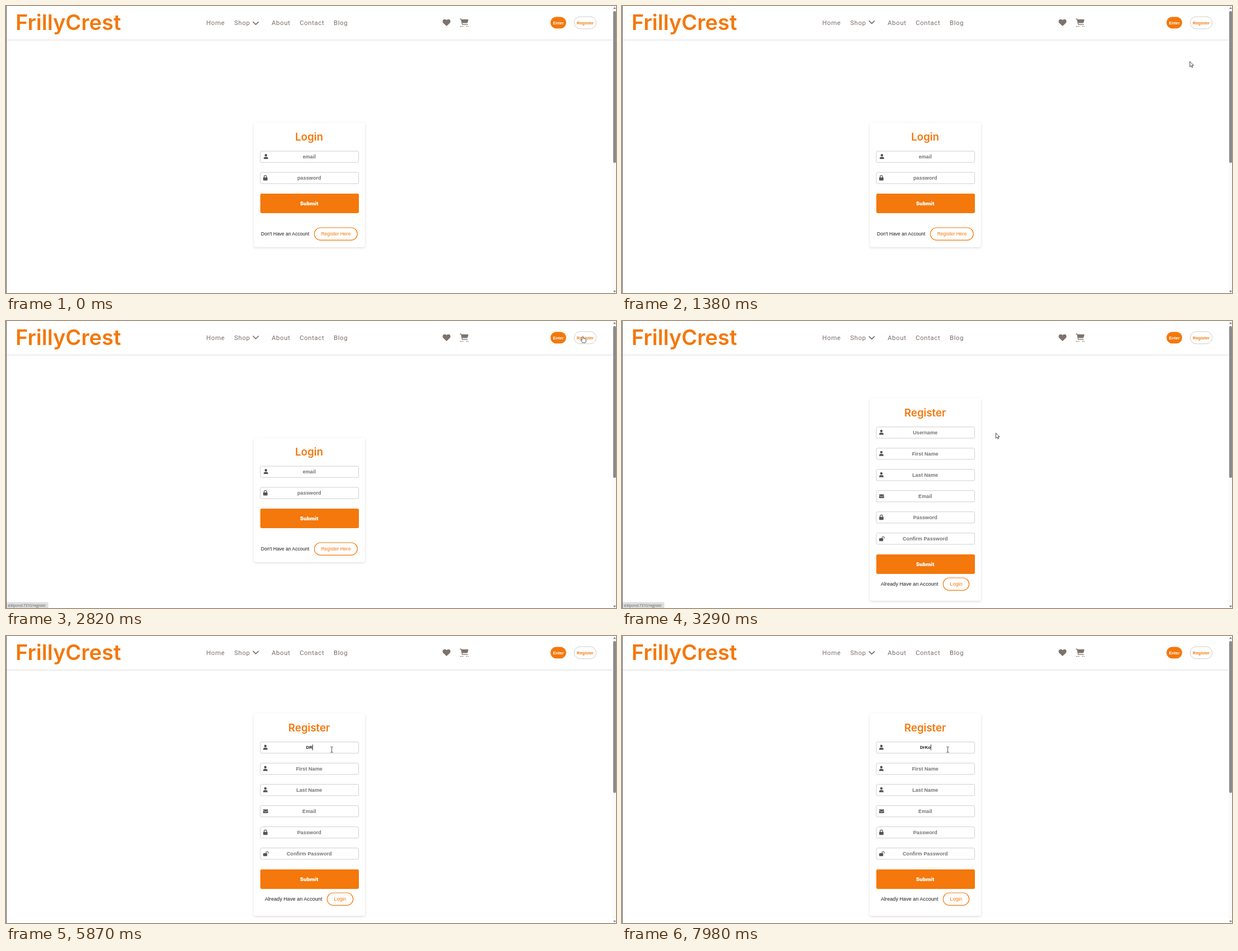
Write an HTML page that moves like this. It is 1089x514 px and loops after 8 s.

```html
<!DOCTYPE html>
<html lang="en">
<head>
<meta charset="utf-8">
<title>Shop sign-in</title>
<style>
  html, body { margin: 0; width: 100%; height: 100%; overflow: hidden; background: #fff; }
  svg { display: block; width: 1089px; height: 514px; }
  .title { font: 600 18.6px Inter, sans-serif; fill: #f4780b; text-anchor: middle; }
  .nav { font: 400 11.4px Roboto, sans-serif; letter-spacing: .61px; fill: #796e68; }
  .arial { font-family: "Liberation Sans", Arial, sans-serif; }
  .hint { font-weight: 700; font-size: 9.15px; fill: #757575; text-anchor: middle; }
  .status { font: 400 6.5px "Open Sans", sans-serif; fill: #5c5c5c; }
</style>
</head>
<body>
<svg id="stage" viewBox="0 0 1089 514" xmlns="http://www.w3.org/2000/svg">
  <defs>
    <filter id="shade" x="-10%" y="-10%" width="120%" height="120%">
      <feDropShadow dx="0" dy="1.5" stdDeviation="2" flood-color="#000" flood-opacity=".14"/>
    </filter>
    <g id="user" fill="#555">
      <circle cy="-2.7" r="2.2"/>
      <path d="M-3.9 4.1V3.2Q-3.9 .3-1 .3H1Q3.9 .3 3.9 3.2V4.1Z"/>
    </g>
    <g id="lock">
      <rect x="-3.9" y="-1" width="7.8" height="5.6" rx="1" fill="#555"/>
      <path d="M-2.3 -.6V-2A2.3 2.3 0 0 1 2.3 -2V-.6" fill="none" stroke="#555" stroke-width="1.2"/>
    </g>
    <g id="open">
      <rect x="-3.9" y="-.6" width="7.2" height="5.2" rx="1" fill="#555"/>
      <path d="M1.3 0V-1.8A1.9 1.9 0 0 1 5.1 -1.8V-.2" fill="none" stroke="#555" stroke-width="1.2"/>
    </g>
    <g id="mail">
      <rect x="-4" y="-3.3" width="8.8" height="6.8" rx="1" fill="#555"/>
      <path d="M-4 -1.3L.4 1.6L4.8 -1.3" fill="none" stroke="#fff" stroke-width=".7"/>
    </g>
  </defs>

  <rect width="1089" height="514" fill="#fff"/>
  <path d="M0 61H1083" stroke="#d9d9d9" stroke-width="1.2"/>
  <path d="M.5 0V514" stroke="#555"/>

  <text id="brand" x="17" y="43" font-family="Inter, sans-serif" font-weight="600" font-size="38" fill="#f4780b">FrillyCrest</text>
  <g class="nav">
    <text x="357.6" y="33.8">Home</text>
    <text x="407.5" y="33.8">Shop</text>
    <text x="474.3" y="33.8">About</text>
    <text x="524.2" y="33.8">Contact</text>
    <text x="585" y="33.8">Blog</text>
  </g>
  <path id="chevron" d="M441.3 -2.3L445.9 2.2L450.5 -2.3" fill="none" stroke="#796e68" stroke-width="1.7" stroke-linecap="round" stroke-linejoin="round"/>
  <path d="M786.5 36L780.6 30.4C778.1 27.4 780.2 23.7 783.2 23.7Q785.3 23.7 786.5 25.2Q787.7 23.7 789.8 23.7C792.8 23.7 794.9 27.4 792.4 30.4Z" fill="#7d726c"/>
  <g fill="none" stroke="#7d726c" stroke-linecap="round" stroke-linejoin="round">
    <path d="M810.6 23.4H812.6L814.6 33.2H824" stroke-width="1.3"/>
    <path d="M813.6 24.4H825L823.5 30H814.6Z" fill="#7d726c" stroke-width="1"/>
    <path d="M811 36.5H813M815 36.6H816M822 36.6H823M825 36.5H825.6" stroke-width="1.1"/>
  </g>
  <rect x="972" y="19.4" width="28" height="20.8" rx="10.4" fill="#f4780b"/>
  <rect x="1014.4" y="19" width="39.2" height="21.8" rx="10.9" fill="#fff" stroke="#ccc"/>
  <g class="arial" font-weight="700" font-size="7.5" text-anchor="middle">
    <text x="986" y="32.5" fill="#fff">Enter</text>
    <text x="1034" y="32.5" fill="#f4780b">Register</text>
  </g>

  <rect x="1083" width="6" height="514" fill="#fafafa"/>
  <rect x="1084" y="9" width="5" height="272" rx="2.5" fill="#8b8b8b"/>
  <path d="M1084 5.3L1086.5 2L1089 5.3ZM1084 509.7L1086.5 513L1089 509.7Z" fill="#7d7d7d"/>

  <g id="login"></g>
  <g id="register"></g>
  <text id="typed" class="arial" x="541.5" y="202.2" font-weight="700" font-size="7.8" fill="#1c1010" text-anchor="middle"></text>
  <rect id="caret" width=".9" height="10.4" fill="#222"/>

  <g id="status">
    <path id="statusBox" fill="#dedede"/>
    <text id="statusText" class="status" x="3" y="511.8"></text>
  </g>

  <g id="pointer" stroke-linejoin="round">
    <path id="arrow" d="M0 0V9.4L2.2 7.4L3.7 10.7L5.2 10L3.8 6.9H6.6Z" fill="#fff" stroke="#333" stroke-width=".9"/>
    <path id="hand" d="M-1.2 7.6V1.2Q0 -.8 1.2 1.2V4.2Q3.2 3.6 3.6 4.8Q5.8 4.5 5.9 6.2V9Q5.6 11.9 4.6 11.9H-.4Q-1.6 10.4-3.6 7.4Q-3 5.7-1.2 7.6Z" fill="#fff" stroke="#444" stroke-width=".9"/>
    <path id="beam" d="M-2.3 -4.8H-.6L0 -4.3L.6 -4.8H2.3M0 -4.3V4.3M-2.3 4.8H-.6L0 4.3L.6 4.8H2.3" fill="none" stroke="#444" stroke-width=".95"/>
  </g>
</svg>

<script>
const LOOP = 8000;
const ORANGE = '#f4780b';
const PAGE_AT = 2950;
const el = id => document.getElementById(id);
const clamp = v => Math.max(0, Math.min(1, v));
const show = (node, on) => node.setAttribute('visibility', on ? 'visible' : 'hidden');

function field(y, icon, label, iconX) {
  return `<rect x="454" y="${y - 10}" width="175.6" height="20.2" rx="2.4" fill="#fff" stroke="#cfcfcf"/>
    <use href="#${icon}" x="${iconX}" y="${y}"/>
    <text class="arial hint" x="541.3" y="${y + 2.9}"${label === 'Username' ? ' id="userHint"' : ''}>${label}</text>`;
}

function card(top, bottom, title, fields, submitY) {
  return `<rect x="442.5" y="${top}" width="198.5" height="${bottom - top}" rx="4" fill="#fff" filter="url(#shade)"/>
    <text class="title" x="541.2" y="${top + 32}">${title}</text>${fields}
    <rect x="454" y="${submitY}" width="176" height="35" rx="2.4" fill="${ORANGE}"/>
    <text x="541.3" y="${submitY + 20.8}" font-family="Inter, sans-serif" font-weight="900" font-size="9" fill="#fff" text-anchor="middle">Submit</text>`;
}

function footer(note, x, link, left, width, y, size) {
  return `<g class="arial" font-size="${size}"><text x="${x}" y="${y + 3}" fill="#1f1a1a">${note}</text>
    <rect x="${left}" y="${y - 11.2}" width="${width}" height="22.4" rx="11.2" fill="#fff" stroke="${ORANGE}" stroke-width="1.2"/>
    <text x="${left + width / 2}" y="${y + 3}" fill="${ORANGE}" text-anchor="middle">${link}</text></g>`;
}

el('login').innerHTML =
  card(209, 431.5, 'Login', field(270, 'user', 'email', 464) + field(308, 'lock', 'password', 463), 336) +
  footer("Don't Have an Account", 455, 'Register Here', 550.5, 76.8, 408.2, 8.53);

const rows = [['user', 'Username'], ['user', 'First Name'], ['user', 'Last Name'],
  ['mail', 'Email'], ['lock', 'Password'], ['open', 'Confirm Password']];
el('register').innerHTML =
  card(138.5, 501, 'Register', rows.map(([icon, label], i) => field(199.7 + 38 * i, icon, label, 463)).join(''), 418) +
  footer('Already Have an Account', 462, 'Login', 573.4, 46.2, 471.2, 9.13);

// Pointer stops: time, x, y
const stops = [[140, 1066, 486], [880, 1013.8, 99.4], [1600, 1013.8, 99.4], [2280, 1001, 24.6],
  [2350, 1001, 24.6], [2650, 1029.5, 27], [2980, 1029.5, 27], [3290, 667.4, 200.6], [3540, 581.6, 203.5]];

function pointerAt(t) {
  let i = 0;
  while (i < stops.length - 2 && t >= stops[i + 1][0]) i++;
  const [t0, x0, y0] = stops[i], [t1, x1, y1] = stops[i + 1];
  const k = clamp((t - t0) / (t1 - t0)), s = k * k * (3 - 2 * k);
  return [x0 + (x1 - x0) * s, y0 + (y1 - y0) * s];
}

// Focus and key presses: time, field content
const keys = [[4380, ''], [5040, 'D'], [5400, 'DR'], [6680, 'D'], [6980, 'Dr'], [7340, 'DrK'], [7660, 'DrKo']];
const blink = (t, from) => Math.floor((t - from) / 505) % 2 === 0;

function drawInput(t) {
  const key = keys.filter(k => t >= k[0]).pop();
  const text = key ? key[1] : '';
  const typed = el('typed');
  typed.textContent = text;
  show(el('userHint'), t >= PAGE_AT && !text);
  let on = false, x = 541.2, y = 194.3;
  if (key) {
    on = blink(t, key[0]);
    if (text) x = 541.5 + typed.getComputedTextLength() / 2;
  } else if (t >= 1860 && t < PAGE_AT) {
    on = blink(t, 1860);
    y = 264.4;
  }
  const caret = el('caret');
  caret.setAttribute('x', x);
  caret.setAttribute('y', y);
  show(caret, on);
}

function drawStatus(t) {
  const joining = t >= 2560;
  const right = joining ? 75.5 : 68.5;
  el('statusBox').setAttribute('d', `M1 503.5H${right - 1.5}Q${right} 503.5 ${right} 505V514H1Z`);
  el('statusText').textContent = 'stillpond:7310/' + (joining ? 'register' : 'login');
  el('status').setAttribute('opacity', clamp((t - 2290) / 150) * clamp((3840 - t) / 160));
}

function drawPointer(t) {
  const [x, y] = pointerAt(t);
  const kind = x < 630 ? 'beam' : y < 41 ? 'hand' : 'arrow';
  el('pointer').setAttribute('transform', `translate(${x} ${y})`);
  for (const id of ['arrow', 'hand', 'beam']) show(el(id), t >= 140 && id === kind);
}

function draw(t) {
  const lift = 29.7 + 1.25 * Math.cos((t - 50) / 1015 * 2 * Math.PI);
  el('chevron').setAttribute('transform', `translate(0 ${lift})`);
  show(el('login'), t < PAGE_AT);
  show(el('register'), t >= PAGE_AT);
  drawInput(t);
  drawStatus(t);
  drawPointer(t);
}

const start = performance.now();
function tick() {
  draw((performance.now() - start) % LOOP);
  requestAnimationFrame(tick);
}
draw(0);
requestAnimationFrame(tick);
</script>
</body>
</html>
```
